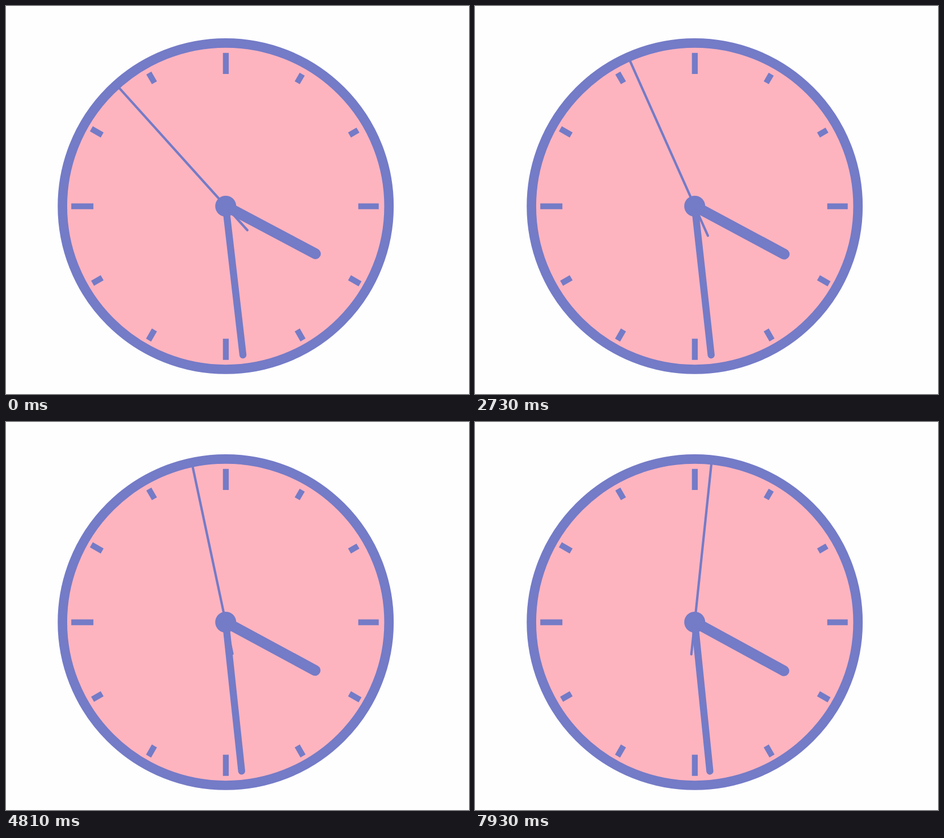
Animation, 817 px wide and 685 px high, one loop 8 s. Source, as an HTML page:

```html
<!DOCTYPE html>
<html lang="en">
<head>
<meta charset="utf-8">
<title>Clock</title>
<style>
  html, body { margin: 0; width: 100%; height: 100%; overflow: hidden; background: #fefefe; }
  svg { display: block; width: 817px; height: 685px; }
  line { stroke: #747bc7; }
</style>
</head>
<body>
<svg viewBox="0 0 817 685">
  <g transform="translate(387.7 353.4)">
    <circle r="288.1" fill="#feb4bf" stroke="#747bc7" stroke-width="16.7"/>
    <g id="marks" transform="translate(.2 .3)" stroke-width="10.3"></g>
    <line id="hour" y2="-179.2" stroke-width="19" stroke-linecap="round"/>
    <line id="minute" y2="-264.4" stroke-width="12.4" stroke-linecap="round"/>
    <line id="second" y1="57" y2="-280" stroke-width="4.2" stroke-linecap="round"/>
    <circle r="18.5" fill="#747bc7"/>
  </g>
</svg>
<script>
  const LOOP = 8000, FIRST = 650, STEP = 1040;
  const get = id => document.getElementById(id);
  const turn = (el, deg) => el.setAttribute('transform', `rotate(${deg})`);

  // Outer end of each hour mark, clockwise from twelve
  const ends = [270.9, 269.5, 269.2, 269.8, 273.5, 272.4, 271.1, 272.7, 271.5, 272.7, 274, 271.8];
  ends.forEach((end, i) => {
    const mark = document.createElementNS('http://www.w3.org/2000/svg', 'line');
    mark.setAttribute('y1', i % 3 ? -252 : -233.7);
    mark.setAttribute('y2', -end);
    turn(mark, i * 30);
    get('marks').append(mark);
  });

  const hour = get('hour'), minute = get('minute'), second = get('second');

  function draw(ms) {
    const tick = ms < FIRST ? 0 : 1 + Math.floor((ms - FIRST) / STEP);
    turn(second, 318 + tick * 6);
    turn(minute, 173.4 + tick * 0.1);
    turn(hour, 117.95 + tick * 0.083);
  }

  const start = performance.now();
  function frame() {
    draw((performance.now() - start) % LOOP);
    requestAnimationFrame(frame);
  }
  frame();
</script>
</body>
</html>
```
